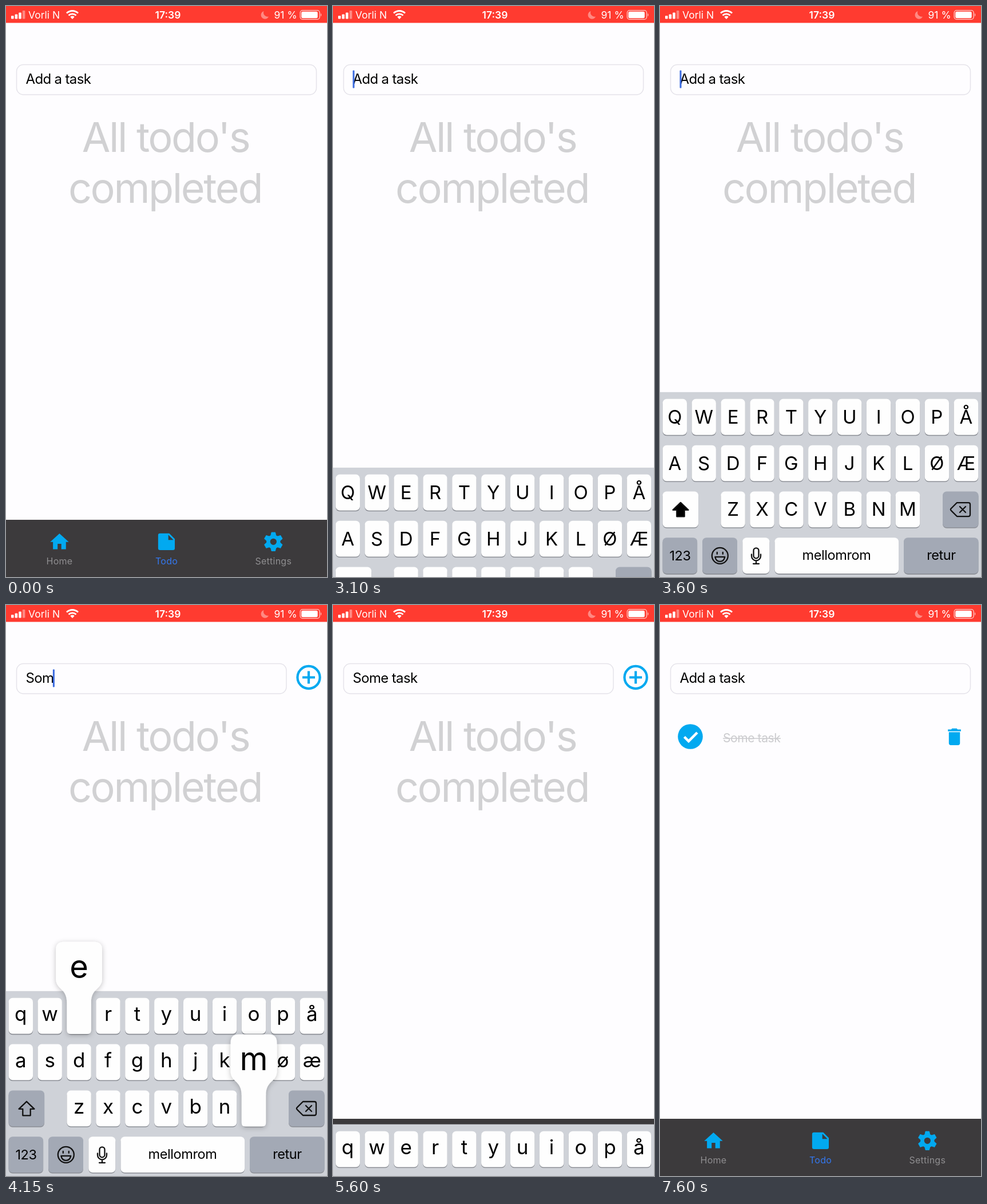
These frames come from a looping animation (561x998 px, 8000 ms). An HTML page:

```html
<!DOCTYPE html>
<html lang="en">
<head>
<meta charset="utf-8">
<title>Todo app</title>
<style>
html, body { margin: 0; width: 100%; height: 100%; overflow: hidden; background: #fefdff; }
svg { display: block; width: 561px; height: 998px; }
text { font-family: Inter, Roboto, sans-serif; font-optical-sizing: none; white-space: pre; }
.mid { text-anchor: middle; }
.field { font-size: 24px; letter-spacing: -.65px; }
.big { font-size: 72px; letter-spacing: -2.4px; fill: #d1d1d3; }
.tab { font-size: 16px; letter-spacing: .25px; fill: #8f8e90; }
.status { font-size: 17.5px; fill: #fff; }
.word { font-size: 23.5px; letter-spacing: -.4px; }
.line { fill: none; stroke: #111; stroke-width: 2.3; stroke-linecap: round; stroke-linejoin: round; }
</style>
</head>
<body>
<svg id="stage" viewBox="0 0 561 998">
  <defs>
    <filter id="soft" x="-40%" y="-30%" width="180%" height="160%">
      <feDropShadow dx="0" dy="2" stdDeviation="5" flood-color="#000" flood-opacity=".24"/>
    </filter>
  </defs>
  <rect width="561" height="998" fill="#fefdff"/>

  <rect width="561" height="29.5" fill="#ff3b30"/>
  <g fill="#fff">
    <rect x="9" y="17" width="4.6" height="5.5" rx="1"/>
    <rect x="15.6" y="14.5" width="4.6" height="8" rx="1"/>
    <rect x="22.2" y="11.5" width="4.6" height="11" rx="1"/>
    <rect x="28.8" y="8" width="4.6" height="14.5" rx="1" opacity=".4"/>
    <path d="M116 23l-3.7-4a5.4 5.4 0 0 1 7.4 0z"/>
    <path d="M109.5 16.4a9.4 9.4 0 0 1 13 0M106 12.6a14.2 14.2 0 0 1 20 0" fill="none" stroke="#fff" stroke-width="2.8"/>
    <path d="M450.5 9a7 7 0 1 0 8.5 9.5a7.2 7.2 0 0 1-8.5-9.5z" opacity=".4"/>
    <rect x="514.2" y="7.7" width="34" height="15.6" rx="4" fill="none" stroke="#fff" stroke-width="1.3" opacity=".75"/>
    <rect x="516.2" y="9.7" width="28.5" height="11.6" rx="2.2"/>
    <path d="M550 12.5q2.5 3 0 6z" opacity=".75"/>
  </g>
  <text class="status" x="39" y="22">Vorli N</text>
  <text class="status mid" x="283" y="22" font-weight="600">17:39</text>
  <text class="status" x="468.5" y="22">91 %</text>

  <rect id="box" x="18.5" y="102.5" height="52.5" rx="12" fill="#fefdff" stroke="#e5e3ea" stroke-width="1.5"/>
  <text id="entry" class="field" x="34.5" y="136"></text>
  <rect id="caret" y="112.5" width="3" height="31" rx="1" fill="#3b6be0"/>
  <g id="plus" fill="none" stroke="#02a9f0" stroke-width="4.2">
    <circle cx="529" cy="126.5" r="19.6"/>
    <path d="M518 126.5h22M529 115.5v22"/>
  </g>

  <g id="empty" class="mid">
    <text class="big" x="279" y="255">All todo's</text>
    <text class="big" x="278" y="344">completed</text>
  </g>

  <g id="task">
    <circle id="ring" cx="53" cy="230" r="19.6" fill="none" stroke="#02a9f0" stroke-width="4.2"/>
    <g id="done">
      <circle cx="53" cy="230" r="21.8" fill="#02a9f0"/>
      <path d="M42.5 230.5l7.5 7.5 15-15" fill="none" stroke="#fff" stroke-width="4.5"/>
    </g>
    <text id="name" x="110" y="240" font-size="21" letter-spacing="-.4">Some task</text>
    <rect id="strike" x="110" y="232.5" width="101" height="1.5" fill="#cbcbce"/>
    <path transform="translate(495.1 211) scale(1.62)" fill="#02a9f0"
      d="M6 19c0 1.1.9 2 2 2h8c1.1 0 2-.9 2-2V7H6zM19 4h-3.5l-1-1h-5l-1 1H5v2h14z"/>
  </g>

  <rect y="898" width="561" height="100" fill="#3c3a3c"/>
  <g fill="#02a9f0">
    <path transform="translate(74 917.2) scale(1.62)" d="M10 20v-6h4v6h5v-8h3L12 3 2 12h3v8z"/>
    <path transform="translate(261 917) scale(1.62)" fill-rule="evenodd"
      d="M14 10V4.5L19.5 10zM5 3a2 2 0 0 0-2 2v14a2 2 0 0 0 2 2h14a2 2 0 0 0 2-2V9l-6-6z"/>
    <g id="gear" transform="translate(467.3 936.3) scale(1.62)">
      <circle r="5.5" fill="none" stroke="#02a9f0" stroke-width="4"/>
    </g>
  </g>
  <text class="tab mid" x="93.5" y="976">Home</text>
  <text class="tab mid" x="280.5" y="976" style="fill:#3478f0">Todo</text>
  <text class="tab mid" x="467.3" y="976">Settings</text>

  <g id="keyboard"><rect width="561" height="330" fill="#cfd2d8"/></g>
</svg>
<script>
const LOOP = 8000, KEY_W = 42.4, KEY_H = 62.8, PITCH = 50.9, ROW = 80.8;
const KB_HEIGHT = 323.2, KB_TOP = 674.8, GREY = '#a3a9b5', WHITE = '#fefefe';
const RISE = 2992, FOCUS = 3050, RETURN_DOWN = 5350, FALL = 5462, ADDED = 6450, CHECKED = 7600;
// [character, press, insert, popup gone]
const strokes = [
  ['S', 3680, 3800, 3850], ['o', 3850, 3950, 4050], ['m', 4000, 4100, 4200],
  ['e', 4100, 4200, 4300], [' ', 4270, 4350, 4400], ['t', 4350, 4450, 4500],
  ['a', 4480, 4550, 4620], ['s', 4560, 4650, 4720], ['k', 4660, 4750, 4850]
];

const $ = id => document.getElementById(id);
const keyboard = $('keyboard');

function add(parent, tag, attrs, content = '') {
  const node = document.createElementNS('http://www.w3.org/2000/svg', tag);
  for (const k in attrs) node.setAttribute(k, attrs[k]);
  node.textContent = content;
  parent.appendChild(node);
  return node;
}
const show = (node, on) => { node.style.display = on ? '' : 'none'; };

for (let i = 0; i < 6; i++)
  add($('gear'), 'path', { d: 'M-2-10h4l.9 4h-5.8z', transform: `rotate(${i * 60})`,
    stroke: '#02a9f0', 'stroke-width': .6, 'stroke-linejoin': 'round' });

function addKey(x, row, w, fill) {
  const y = 12 + row * ROW, box = { x, width: w, height: KEY_H, rx: 7 };
  add(keyboard, 'rect', { ...box, y: y + 1.6, fill: '#8b8e95' });
  return add(keyboard, 'rect', { ...box, y, fill });
}

const letters = {};
['qwertyuiopå', 'asdfghjkløæ', '  zxcvbnm'].forEach((line, row) => {
  [...line].forEach((ch, col) => {
    if (ch === ' ') return;
    const x = 4.6 + col * PITCH;
    addKey(x, row, KEY_W, WHITE);
    letters[ch] = { x, row, label: add(keyboard, 'text', { class: 'mid', x: x + KEY_W / 2 }) };
  });
});

const shiftKey = addKey(4.6, 2, 62.5, GREY);
addKey(494, 2, 62.5, GREY);
addKey(4.6, 3, 60.5, GREY);
addKey(74, 3, 61, GREY);
addKey(144.3, 3, 47, WHITE);
const spaceKey = addKey(200.5, 3, 216.5, WHITE);
const returnKey = addKey(426, 3, 130.5, GREY);

const icon = (x, y, d) =>
  add(keyboard, 'path', { class: 'line', transform: `translate(${x} ${y})`, d });
const shiftIcon = icon(36, 205.5, 'M0-12.5L13.5.5H6.7V12H-6.7V.5H-13.5z');
icon(525, 205.2, 'M-6-12H14q3 0 3 3V9q0 3-3 3H-6L-16.5 1.5q-1.2-1.5 0-3zM-1-5L9 5M9-5L-1 5');
icon(104.8, 286, 'M-14 0a14 14 0 1 0 28 0a14 14 0 1 0-28 0M-5-6v3M5-6v3M-8.5 2H8.5Q7 10 0 10T-8.5 2z');
icon(168, 286, 'M-4.5-9a4.5 4.5 0 0 1 9 0v9a4.5 4.5 0 0 1-9 0zM-8-2.5v3a8 8 0 0 0 16 0v-3M0 8.5v5.5M-5 14H5');
[['123', 35, 294.5], ['mellomrom', 308.5, 293], ['retur', 491.5, 293]].forEach(([s, x, y]) =>
  add(keyboard, 'text', { class: 'word mid', x, y }, s));

// Balloon that grows out of a pressed key
function addPopup(ch) {
  const { x, row } = letters[ch.toLowerCase()];
  const w = KEY_W, l = Math.max(-19.2, 3 - x), r = l + 80.8;
  const g = add(keyboard, 'g', { transform: `translate(${x} ${12 + row * ROW})` });
  add(g, 'path', { fill: WHITE, filter: 'url(#soft)', d: `M${l + 14}-98H${r - 14}q14 0 14 14V-34
    C${r}-14 ${w}-18 ${w} 8V57q0 6-6 6H6q-6 0-6-6V8C0-18 ${l}-14 ${l}-34V-84q0-14 14-14z` });
  add(g, 'text', { class: 'mid', x: (l + r) / 2, y: -35, 'font-size': ch < 'a' ? 52 : 56 }, ch);
  return g;
}
const popups = strokes.map(([ch]) => ch === ' ' ? null : addPopup(ch));

let upper = null;
function setCase(on) {
  if (on === upper) return;
  upper = on;
  for (const ch in letters) {
    const { row, label } = letters[ch];
    label.textContent = on ? ch.toUpperCase() : ch;
    label.setAttribute('y', row * ROW + (on ? 55 : 52.7));
    label.setAttribute('font-size', on ? 33 : 35);
  }
  shiftKey.setAttribute('fill', on ? WHITE : GREY);
  shiftIcon.style.fill = on ? '#000' : 'none';
}

// Critically damped spring, 1 at rest to 0 when settled
function spring(ms) {
  const s = 18.26 * Math.max(0, ms) / 1000;
  return (1 + s) * Math.exp(-s);
}

function render(t) {
  const hidden = t < FALL ? spring(t - RISE) : 1 - spring(t - FALL);
  keyboard.setAttribute('transform', `translate(0 ${KB_TOP + KB_HEIGHT * hidden})`);
  show(keyboard, t >= FOCUS && t < 6000);
  setCase(t < strokes[0][2]);
  strokes.forEach(([, down, , gone], i) => {
    const on = t >= down && t < gone;
    if (popups[i]) show(popups[i], on);
    else spaceKey.setAttribute('fill', on ? GREY : WHITE);
  });
  returnKey.setAttribute('fill', t >= RETURN_DOWN && t < FALL ? WHITE : GREY);

  const typed = t < ADDED ? strokes.filter(s => t >= s[2]).map(s => s[0]).join('') : '';
  $('entry').textContent = typed || 'Add a task';
  $('box').setAttribute('width', typed ? 471.5 : 524);
  show($('plus'), typed);
  show($('caret'), t >= FOCUS && t < FALL);
  $('caret').setAttribute('x', 33 + Math.max(1.5, typed && $('entry').getComputedTextLength()));

  const checked = t >= CHECKED;
  show($('empty'), t < ADDED);
  show($('task'), t >= ADDED);
  show($('ring'), !checked);
  show($('done'), checked);
  show($('strike'), checked);
  $('name').setAttribute('fill', checked ? '#cbcbce' : '#000');
}

function tick() {
  render(performance.now() % LOOP);
  requestAnimationFrame(tick);
}
tick();
</script>
</body>
</html>
```
